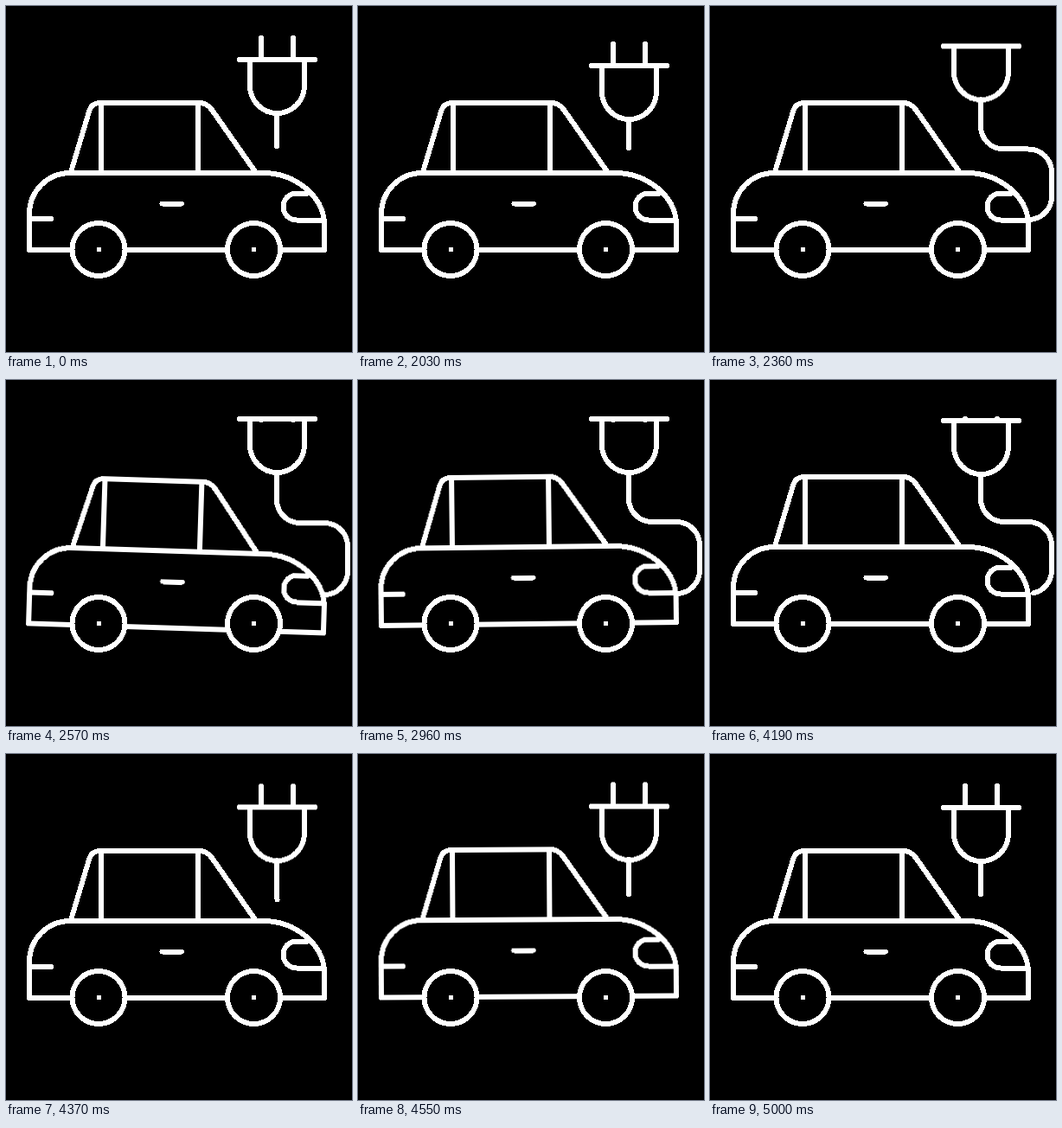
An HTML page without scripts that plays this animation: 400 by 400 pixels, repeating every 5.03 s.

```html
<!DOCTYPE html>
<html lang="en">
<head>
<meta charset="utf-8">
<title>Electric car charging</title>
<style>
  html, body { margin: 0; width: 100%; height: 100%; overflow: hidden; background: #000; }
  svg { display: block; width: 100%; height: 100%; shape-rendering: crispEdges; }
  .line { fill: none; stroke: #fff; stroke-width: 6; stroke-linecap: round; stroke-linejoin: round; }
  .wheel { fill: #000; }
  .hub { fill: #fff; stroke: none; }

  .car, .plug, .prongs, .cord { animation: 5030ms ease-in-out infinite; }
  .car { animation-name: sway; transform-origin: 198px 282px; }
  .plug { animation-name: lift; }
  .prongs { animation-name: retract; }
  .cord { animation-name: connect; stroke-dasharray: 38 400; }

  /* The body rocks on its wheels when the cord is attached or pulled off */
  @keyframes sway {
    0%, 47.7% { transform: none; }
    50.9% { transform: translate(-1px, 5px) rotate(1.85deg); }
    54.1% { transform: translateY(-3.5px) rotate(-.6deg); }
    56.5% { transform: translateY(1px) rotate(.4deg); }
    58.85% { transform: rotate(-.65deg); }
    61.4% { transform: translateY(.5px) rotate(.3deg); }
    63.6%, 87% { transform: none; }
    90.4% { transform: translateY(-1.5px) rotate(-.35deg); }
    92.4% { transform: translate(-1px, 4.6px) rotate(1.8deg); }
    95.2% { transform: translateY(-2px) rotate(-.5deg); }
    97.4% { transform: translateY(.5px) rotate(.2deg); }
    99.2%, 100% { transform: none; }
  }

  @keyframes lift {
    0%, 40.34% { transform: none; }
    40.35% { transform: translateY(7px); }
    48.3%, 83.28% { transform: translateY(-17px); }
    83.29% { transform: translateY(-15px); }
    87.5% { transform: none; }
    90.4% { transform: translateY(-1.5px); }
    93.4%, 100% { transform: none; }
  }

  @keyframes retract {
    0%, 40.35% { d: path("M295 37V62M332 37V62"); }
    48.3%, 83.28% { d: path("M295 63V62M332 63V62"); }
    83.29% { d: path("M295 60V62M332 60V62"); }
    87.5%, 100% { d: path("M295 37V62M332 37V62"); }
  }

  @keyframes connect {
    0%, 40.34% {
      d: path("M313 124V164C313 179 325 189 340 189H368C383 189 395 201 395 210V225C395 238 383 247 368 247");
      stroke-dasharray: 38 400;
    }
    40.35% {
      d: path("M313 131V169C313 181 325 189 340 189H368C383 189 395 201 395 210V225C395 238 383 247 368 247");
      stroke-dasharray: 33 400;
    }
    48.3%, 83.28% {
      d: path("M313 107V137C313 152 325 164 340 164H368C383 164 395 176 395 191V220C395 235 383 247 368 247");
      stroke-dasharray: 220 400;
      transform: none;
    }
    51% { transform: translateY(1.3px); }
    54.1% { transform: none; }
    83.29% {
      d: path("M313 109V137C313 152 325 164 340 164H368C383 164 395 176 395 191V220C395 235 383 247 368 247");
      stroke-dasharray: 206 400;
    }
    87.5% {
      d: path("M313 124V164C313 179 325 189 340 189H368C383 189 395 201 395 210V225C395 238 383 247 368 247");
      stroke-dasharray: 38 400;
    }
    90.4% {
      d: path("M313 122V164C313 179 325 189 340 189H368C383 189 395 201 395 210V225C395 238 383 247 368 247");
      stroke-dasharray: 40 400;
    }
    93.4%, 100% {
      d: path("M313 124V164C313 179 325 189 340 189H368C383 189 395 201 395 210V225C395 238 383 247 368 247");
      stroke-dasharray: 38 400;
    }
  }
</style>
</head>
<body>
<svg viewBox="0 0 400 400">
  <rect width="400" height="400"/>
  <g class="line">
    <path class="cord" d="M313 124V164C313 179 325 189 340 189H368C383 189 395 201 395 210V225C395 238 383 247 368 247"/>
    <g class="plug">
      <path class="prongs" d="M295 37V62M332 37V62"/>
      <path d="M270 62H357M282 62V92A31.5 32 0 0 0 345 92V62"/>
    </g>
    <g class="car">
      <path d="M27 282V240A47 47 0 0 1 74 193H297C335 193 366 220 368 250V282Z"/>
      <path d="M75 192L96 122Q99 112 109 112H224Q232 112 238 120L287 190"/>
      <path d="M110 112V193M222 112V193"/>
      <path d="M349 216.5H336A15.5 15.5 0 0 0 336 247.5H368"/>
      <path d="M27 246H52M180.5 228.5H203"/>
    </g>
    <g class="wheel">
      <circle cx="107" cy="281.5" r="30.5"/>
      <circle cx="286.500" cy="281.5" r="30.5"/>
    </g>
    <g class="hub">
      <circle cx="107.5" cy="281.5" r="2.8"/>
      <circle cx="286.5" cy="281.5" r="2.8"/>
    </g>
  </g>
</svg>
</body>
</html>
```
